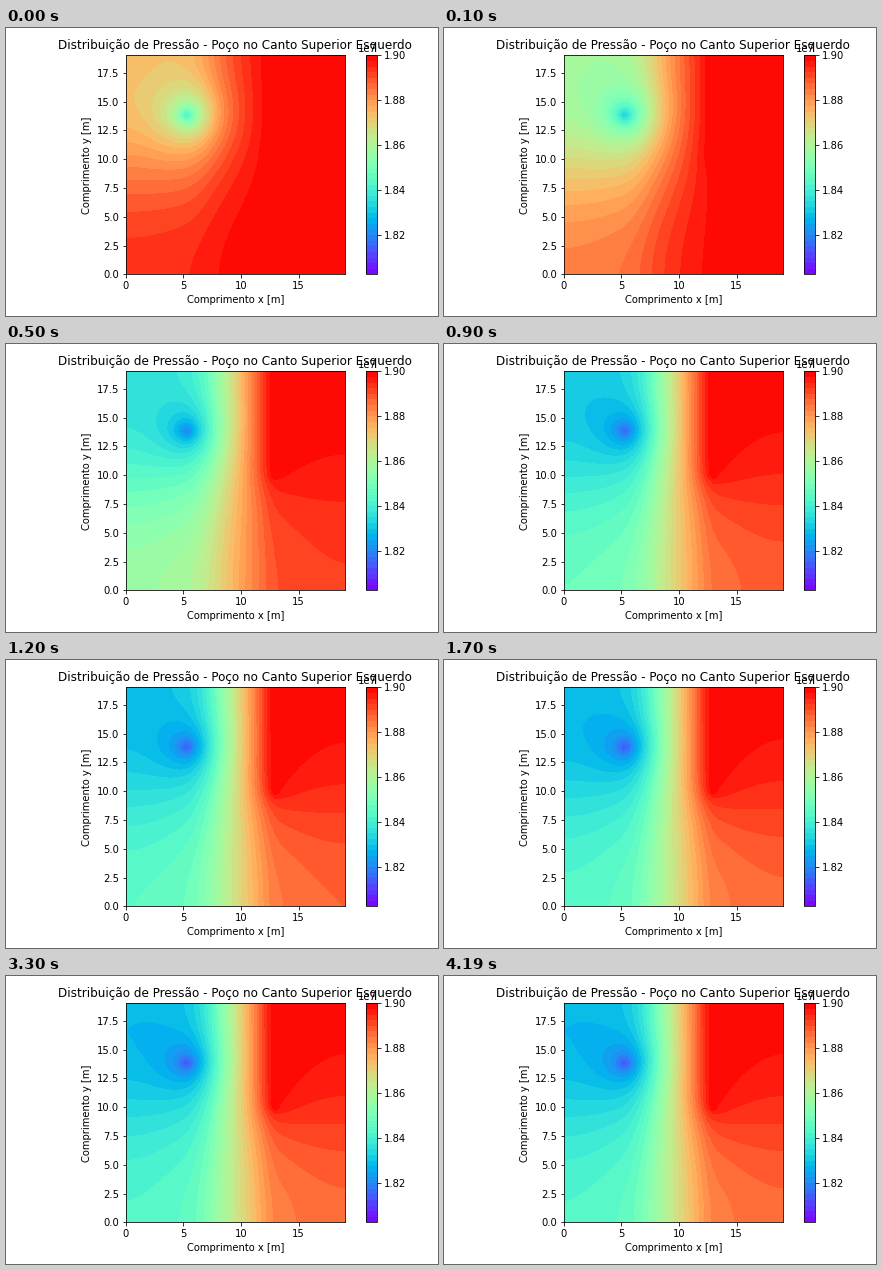
Write a matplotlib script that moves like this. It is 432x288 px and loops after 8.21 s.

```python
import numpy as np
import matplotlib.pyplot as plt
from matplotlib.animation import FuncAnimation

WIDTH, HEIGHT, DPI = 432, 288, 72
LOOP_MS, FRAMES = 8210, 83
STEPS, SUBSTEPS = 39, 4

# Reservoir grid: a tight vertical strip separates two permeable zones.
N, LENGTH = 45, 19.0
axis = np.linspace(0, LENGTH, N)
X, Y = np.meshgrid(axis, axis)
CELL = axis[1]
K_LEFT, K_STRIP, K_RIGHT = 55.0, 10.5, 54.0
STRIP_EDGES = [5.0, 7.6, 12.2, 13.4]

# Pressures in units of 1e7 Pa
P_INITIAL, P_WELL = 1.9, 1.778
WELL_INDEX, WELL_RADIUS = 48.0, 0.28
WELL_X, WELL_Y = axis[12], axis[32]
LEVELS = np.linspace(1.8025, 1.9, 40) * 1e7


def flow_matrix():
    """Conductances between neighbouring cells, no flow at the edges."""
    resistance = np.interp(X, STRIP_EDGES,
                           [1 / K_LEFT, 1 / K_STRIP, 1 / K_STRIP, 1 / K_RIGHT]).ravel()
    cells = np.arange(N * N).reshape(N, N)
    matrix = np.zeros((N * N, N * N))
    pairs = [(cells[:, :-1], cells[:, 1:]), (cells[:-1], cells[1:])]
    for first, second in pairs:
        a, b = first.ravel(), second.ravel()
        k = 2 / (resistance[a] + resistance[b])
        matrix[a, b] -= k
        matrix[b, a] -= k
        matrix[a, a] += k
        matrix[b, b] += k
    return matrix


def simulate():
    """Implicit time steps of the drawdown below the initial pressure."""
    well = np.exp(-((X - WELL_X) ** 2 + (Y - WELL_Y) ** 2) / (2 * WELL_RADIUS ** 2)).ravel()
    well /= well.sum()
    storage = CELL ** 2 * SUBSTEPS
    matrix = flow_matrix() + WELL_INDEX * np.outer(well, well)
    matrix[np.diag_indices(N * N)] += storage
    source = WELL_INDEX * well * (P_INITIAL - P_WELL)

    # Constant pressure on a line in the upper part of the field
    column = np.arange(N * N).reshape(N, N)[23:, 30]
    matrix[column] = 0
    matrix[column, column] = 1
    inverse = np.linalg.inv(matrix)

    drawdown = np.zeros(N * N)
    fields = []
    for _ in range(STEPS):
        for _ in range(SUBSTEPS):
            rhs = storage * drawdown + source
            rhs[column] = 0
            drawdown = inverse @ rhs
        pressure = (P_INITIAL - drawdown).reshape(N, N) * 1e7
        fields.append(np.clip(pressure, LEVELS[0] + 1, LEVELS[-1] - 1))
    return fields


def pixel_axes(left, top, width, height):
    return fig.add_axes([left / WIDTH, 1 - (top + height) / HEIGHT,
                         width / WIDTH, height / HEIGHT])


def draw_field(step):
    return ax.contourf(X, Y, fields[step], levels=LEVELS, cmap="rainbow")


def update(frame):
    global contours
    contours.remove()
    contours = draw_field(min(frame, STEPS - 1))
    return [contours]


fields = simulate()
fig = plt.figure(figsize=(WIDTH / DPI, HEIGHT / DPI), dpi=DPI, facecolor="white")
ax = pixel_axes(119.8, 27.4, 219, 219)
bar_ax = pixel_axes(360, 27.4, 10.95, 219)

contours = draw_field(0)
ax.set(xlim=(0, LENGTH), ylim=(0, LENGTH),
       xticks=np.arange(0, 16, 5), yticks=np.arange(0, 18, 2.5),
       xlabel="Comprimento x [m]", ylabel="Comprimento y [m]")
ax.set_title("Distribuição de Pressão - Poço no Canto Superior Esquerdo")
fig.colorbar(contours, cax=bar_ax, ticks=np.arange(1.82, 1.901, 0.02) * 1e7)

animation = FuncAnimation(fig, update, frames=FRAMES, interval=LOOP_MS / FRAMES,
                          repeat=True, repeat_delay=0, blit=False)
plt.show()
```
